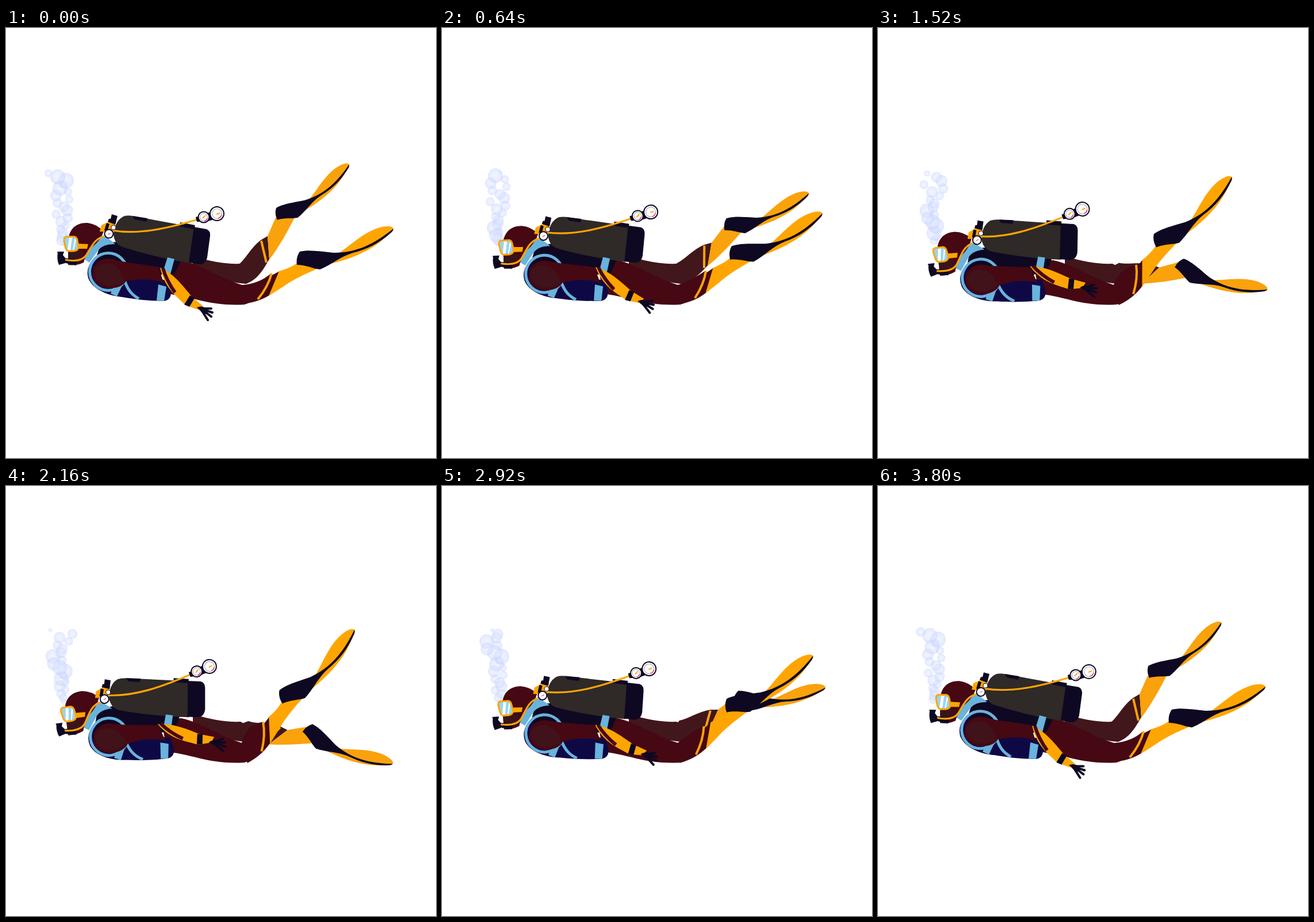
An HTML page that plays this animation: 748 px wide and 748 px high, repeating every 3.84 s.

```html
<!DOCTYPE html>
<html lang="en">
<head>
<meta charset="utf-8">
<title>Diver</title>
<style>
  html, body { margin: 0; width: 100%; height: 100%; overflow: hidden; background: #fff; }
  svg { display: block; width: 100vw; height: 100vh; }
  .maroon { fill: #460813; }
  .shade { fill: #41171b; }
  .ink { fill: #0e0822; }
  .vest { fill: #0e0945; }
  .sky { fill: #69b3dc; }
  .gold { fill: #ffa502; }
  .dim { fill: #f9a20c; color: #f9a20c; }
  .line { fill: none; stroke: #ffa502; stroke-width: 4; }
  .thin { stroke-width: 3.2; }
  .skyline { fill: none; stroke: #69b3dc; stroke-width: 5; }
  .maroonline { fill: none; stroke: #460813; stroke-width: 6; }
  .dial { fill: #fff; stroke: #0e0822; stroke-width: 2; }
  .finger { fill: none; stroke: #0e0822; stroke-width: 4; stroke-linecap: round; stroke-linejoin: round; }
</style>
</head>
<body>
<svg viewBox="0 0 748 748">
  <defs>
    <radialGradient id="air">
      <stop offset="0" stop-color="#dfe7ff" stop-opacity=".4"/>
      <stop offset=".75" stop-color="#d0dbff" stop-opacity=".5"/>
      <stop offset="1" stop-color="#c3d0ff" stop-opacity=".55"/>
    </radialGradient>
    <g id="fin">
      <path fill="currentColor" d="M550 404C575 399 592 381 612 367C634 351 652 344 667 345Q674 346 674 350C660 366 643 380 622 390C602 400 585 405 562 411Z"/>
      <path class="ink" d="M511 389C527 385 548 389 570 391C610 391 640 376 674 349Q674 352 671 355C650 374 628 385 604 391C582 397 566 412 546 420C535 419 521 412 506 412Q504 399 511 389Z"/>
    </g>
  </defs>

  <g id="bubbles"></g>

  <path class="shade" d="M325 396C355 407 385 411 408 410L430 422Q432 440 418 445C385 443 350 430 325 420Z"/>
  <g id="farShin">
    <path class="shade" d="M405 411C417 402 425 383 443 369L455 362L458 402C448 420 436 440 418 444Q403 445 400 435Z"/>
    <path class="dim" d="M455 362L469 330L502 330C490 353 475 381 458 403Z"/>
    <path class="line" d="M444 370L453 408"/>
    <use href="#fin" class="dim" id="farFin"/>
  </g>

  <path class="maroon" d="M270 405L305 404C345 413 375 438 415 448L432 452Q436 476 415 481C385 483 360 479 338 474C315 468 295 464 280 462Z"/>
  <path class="maroon" id="knee"/>
  <g id="shin">
    <path class="maroon" d="M412 447C430 446 452 436 476 423L458 465C443 474 427 479 407 480Z"/>
    <path class="gold" d="M475 423C490 419 502 413 512 405L546 417C522 427 500 437 482 450L457 466Z"/>
    <path class="line" d="M462 427Q456 450 438 472"/>
    <use href="#fin" color="#ffa502"/>
  </g>

  <g id="torso">
    <path class="ink" d="M165 374L195 372L320 407L304 406L293 428L200 432L150 420Z"/>
    <path fill="#2f2927" d="M206 327Q214 325 226 328L329 347L320 409Q255 398 203 381Q188 376 187 358Q190 334 206 327Z"/>
    <path class="ink" d="M327 346L349 350Q356 353 355 362L350 399Q347 412 335 411L318 408Z"/>
    <path class="ink" d="M221 327L246 331L244 337L224 333ZM303 338L329 343L327 350L302 345Z"/>

    <path class="vest" d="M152 402Q138 417 143 435C151 456 180 466 202 468C230 473 255 475 275 475Q287 473 287 460L284 440L210 425Z"/>
    <path class="sky" d="M190 442L204 444L193 467L182 462ZM265 446L279 450L275 475L262 474Z"/>
    <path class="sky" d="M281 399L293 402L286 428L273 424Z"/>
    <path class="skyline thin" d="M207 441C212 456 219 464 231 471"/>
    <path class="sky" d="M164 360Q178 364 190 376Q170 375 161 386L145 408L136 402Q144 386 164 360Z"/>

    <path class="maroon" d="M108 374C108 350 122 338 142 339Q158 341 170 354Q164 370 150 381Q137 397 135 408Q122 414 108 412Z"/>
    <path fill="#3a141a" d="M108 388H134Q133 399 126 402L108 402Z"/>
    <path class="ink" d="M101 400L124 403L122 413L108 410L101 408Z"/>
    <path class="ink" d="M90 391Q88 390 90 389L101 389L99 395L103 400L103 409L92 412Q88 402 90 391Z"/>
    <path class="line thin" d="M103 403C118 406 132 405 139 396C149 381 153 367 171 362"/>
    <path class="gold" d="M123 375L143 376L141 384L123 384Z"/>
    <path fill="#9bd4ef" stroke="#ffa502" stroke-width="3" d="M105 363H119Q123 364 124 369L126 380Q126 387 118 388H108Q104 386 103 380L101 369Q101 364 105 363Z"/>
    <path fill="#fff" d="M110 365H115L112 386H107ZM120 366L122 369L118 386H116Z"/>

    <path class="gold" d="M166 343L177 338L180 332L192 337L188 348L176 355L163 354Z"/>
    <path class="ink" d="M184 324L194 327L190 342L177 337L179 332L182 332ZM175 339L180 341L176 354L171 352Z"/>

    <g id="hose">
      <path class="line thin" d="M184 352C230 360 280 349 333 333"/>
      <path class="ink" d="M330 329L342 325L361 318L365 332L348 337L332 337Z"/>
      <circle class="dial" cx="344" cy="329" r="9.5"/>
      <circle class="dial" cx="367" cy="323" r="12"/>
      <g fill="none" stroke="#a8a0b8">
        <circle cx="344" cy="329" r="6.5"/>
        <circle cx="367" cy="323" r="8.5"/>
        <path stroke="#e0348a" stroke-width="1.5" d="M350 331Q349 335 345 336M375 325Q374 330 369 331"/>
        <path stroke="#ffa502" stroke-width="2" d="M342 331L347 326M366 324L372 322"/>
      </g>
    </g>
    <circle class="dial" cx="179" cy="358" r="7.5"/>
    <path stroke="#e0348a" d="M177 359L182 357"/>
    <circle fill="#fff" stroke="#0e0822" cx="187" cy="347" r="4"/>

    <circle class="skyline" cx="178" cy="424" r="32.5"/>
    <g id="forearm">
      <path class="gold" d="M266 416C288 424 306 446 323 467L343 484L334 490L312 482C294 464 276 452 268 417Z"/>
      <path class="maroonline" d="M273 418Q279 439 294 460"/>
      <path class="ink" d="M320 465L328 470L319 485L310 481Z"/>
      <g id="hand">
        <path class="ink" d="M332 486Q341 482 349 488L350 498L342 496Z"/>
        <path class="finger" d="M342 488L357 488M344 490L359 495M344 492L357 502M341 492L351 508"/>
      </g>
    </g>
    <path class="maroon" d="M152 416Q161 401 180 401Q202 407 235 411L267 416Q269 430 275 444Q258 437 235 437L209 440Q202 452 181 453Q155 451 150 431Z"/>
    <path fill="#40131a" d="M154 420Q165 405 185 411Q200 418 206 440Q194 449 177 448Q153 443 154 420Z"/>
  </g>
</svg>
<script>
  const LOOP = 3840, TURN = 1980, BUBBLES = 20;
  const el = id => document.getElementById(id);

  let seed = 11;
  const random = () => (seed = seed * 16807 % 2147483647) / 2147483647;
  random();

  const bubbles = Array.from({ length: BUBBLES }, (_, i) => {
    const node = document.createElementNS('http://www.w3.org/2000/svg', 'circle');
    node.setAttribute('fill', 'url(#air)');
    el('bubbles').append(node);
    return { node, birth: i / BUBBLES, drift: random() * 54 - 27, radius: 7 + 7 * random() ** 1.5 };
  });

  const set = (id, transform) => el(id).setAttribute('transform', transform);
  const turn = (id, angle, x, y) => set(id, `rotate(${angle} ${x} ${y})`);

  function drawBubble({ node, birth, drift, radius }, time) {
    const age = (time + birth) % 1;
    const size = Math.min(1, .4 + age * 6, (1 - age) * 12);
    node.setAttribute('cx', 99 + drift * age ** .7);
    node.setAttribute('cy', 376 - 130 * age);
    node.setAttribute('r', radius * size);
  }

  function draw(ms) {
    const phase = ms < TURN ? ms / TURN : (LOOP - ms) / (LOOP - TURN);
    const kick = (1 - Math.cos(Math.PI * phase)) / 2;
    const sway = (kick + phase) / 2; // the body eases less than the legs

    turn('torso', -8.2 * sway, 269, 421);
    turn('hose', 1.1 * sway, 185, 350);
    turn('forearm', -23 * sway, 259, 424);
    turn('hand', 11 * sway, 320, 476);
    turn('shin', -25.7 * kick, 418, 452);
    turn('farShin', 58.5 * kick, 415, 425);
    set('farFin', `translate(470 ${313 + 7 * kick}) rotate(-17) scale(${.88 + .05 * kick}) translate(-511 -389)`);
    el('knee').setAttribute('d',
      `M410 447Q${438 - 20 * kick} ${447 - 33 * kick} ${462 - 15 * kick} ${426 - 16 * kick}L440 462Z`);

    for (const bubble of bubbles) drawBubble(bubble, ms / LOOP);
  }

  function tick() {
    draw(performance.now() % LOOP);
    requestAnimationFrame(tick);
  }
  tick();
</script>
</body>
</html>
```
